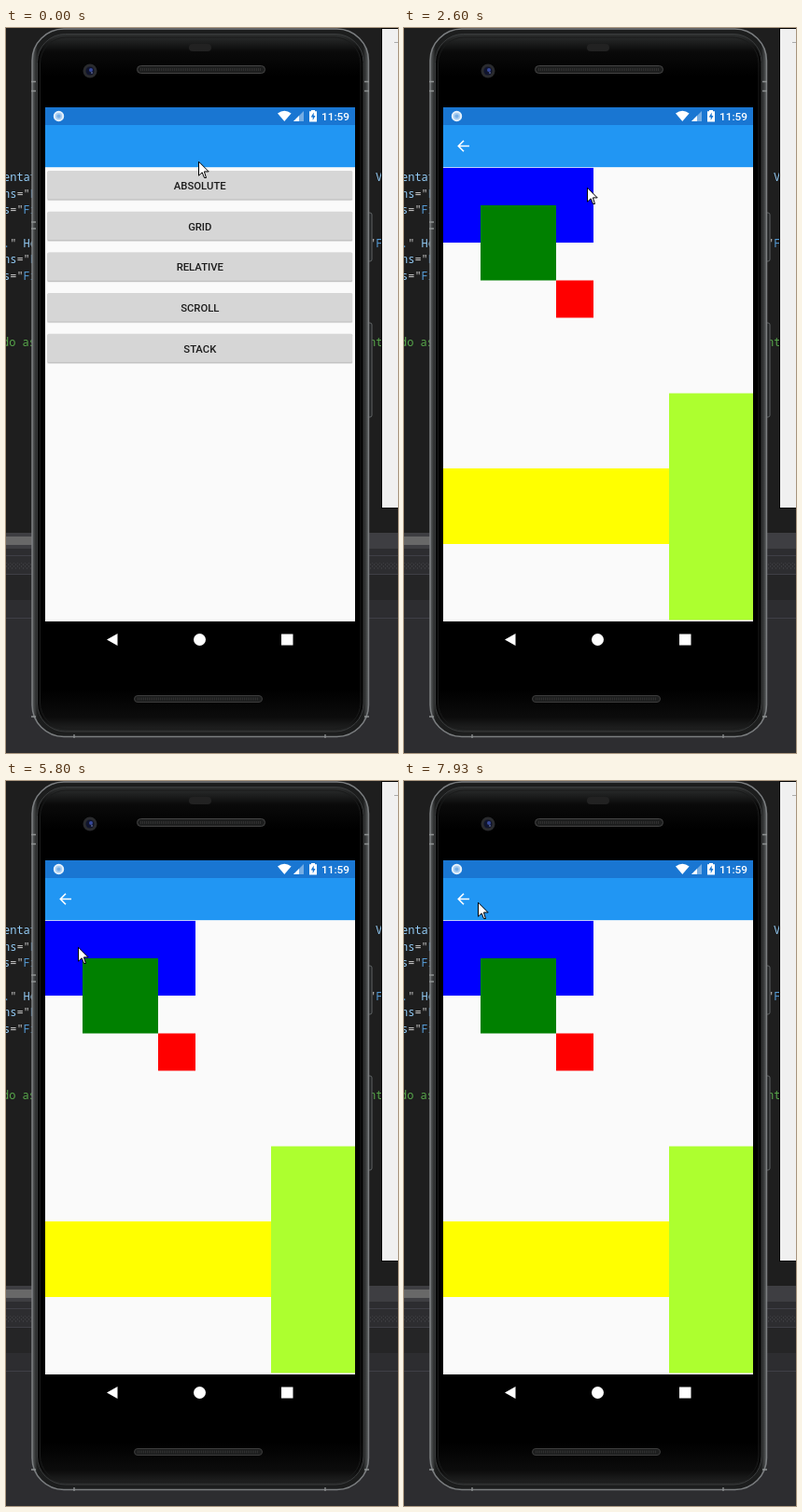
An HTML page for the animation above (8 s loop, 420 px wide and 777 px high).

```html
<!DOCTYPE html>
<html lang="en">
<head>
<meta charset="utf-8">
<title>Layout demo</title>
<style>
html, body { margin: 0; width: 100%; height: 100%; overflow: hidden; background: #1e1e1e; }
svg { display: block; width: 100%; height: 100%; }
.code { font: 12px "Noto Sans Mono", "DejaVu Sans Mono", monospace; white-space: pre; }
.ui { font-family: Roboto, sans-serif; font-weight: 500; }
</style>
</head>
<body>
<svg viewBox="0 0 420 777">
  <defs>
    <linearGradient id="gloss" x2="0" y2="1">
      <stop offset="0" stop-color="#2e3030"/>
      <stop offset=".025" stop-color="#0a0a0a"/>
      <stop offset=".06" stop-color="#000"/>
      <stop offset=".94" stop-color="#000"/>
      <stop offset=".98" stop-color="#0c0c0c"/>
      <stop offset="1" stop-color="#242525"/>
    </linearGradient>
    <linearGradient id="rim">
      <stop offset="0" stop-color="#5c5f60"/>
      <stop offset=".016" stop-color="#1c1d1d"/>
      <stop offset=".984" stop-color="#1c1d1d"/>
      <stop offset="1" stop-color="#5c5f60"/>
    </linearGradient>
    <pattern id="dots" width="4" height="4" patternUnits="userSpaceOnUse">
      <path d="M0 1h1M2 3h1" stroke="#4a4a4e"/>
    </pattern>
    <clipPath id="page"><rect x="42" y="149.800" width="332" height="486.200"/></clipPath>
  </defs>

  <rect width="420" height="777" fill="#1e1e1e"/>
  <rect y="541" width="420" height="17" fill="#3e3e42"/>
  <rect y="545" width="30" height="9" fill="#686868"/>
  <rect y="558" width="420" height="219" fill="#2d2d30"/>
  <rect y="573" width="420" height="7" fill="url(#dots)"/>
  <path d="M0 565.5H420M0 585.5H420M0 632.5H420" stroke="#3f3f46"/>
  <rect y="586" width="420" height="27" fill="#252526"/>
  <g id="code" class="code"></g>
  <rect x="402.500" y=".5" width="20" height="514" fill="#f0f0f0" stroke="#000"/>
  <path d="M416 15.500h4" stroke="#aaa"/>

  <g>
    <rect x="386" y="198" width="6" height="52" rx="2" fill="#222425" stroke="#606365"/>
    <rect x="386" y="316" width="6" height="101" rx="2" fill="#222425" stroke="#606365"/>
    <rect x="28" y="1" width="360.500" height="758.500" rx="34" fill="url(#rim)" stroke="#7b7e80" stroke-width="1.500"/>
    <path d="M27 57.500h5M27 67.500h5M27 208h5M27 215h5M384 57.500h5M384 67.500h5M27 738h5M384 738h5M73 757v4M342 757v4" stroke="#8f9293" stroke-width="1.300"/>
    <rect x="33.500" y="6.500" width="349.500" height="747.500" rx="30" fill="url(#gloss)" stroke="#3a3c3d"/>
    <rect x="36.500" y="10" width="343.500" height="741" rx="28" fill="none" stroke="#1a1b1b"/>
    <rect x="196" y="17" width="24" height="8" rx="4" fill="#222"/>
    <rect x="140.500" y="40.500" width="137" height="8" rx="4" fill="#1d1e1e" stroke="#444"/>
    <path d="M144 44.500H274" stroke="#303030" stroke-width="3" stroke-dasharray="1 1"/>
    <rect x="137.500" y="715.500" width="137" height="7" rx="3.500" fill="#1d1e1e" stroke="#3c3c3c"/>
    <path d="M141 719H271" stroke="#303030" stroke-width="3" stroke-dasharray="1 1"/>
    <circle cx="90" cy="46" r="7.500" fill="#2a2b2e"/>
    <circle cx="90" cy="46" r="4.500" fill="#10142c"/>
    <circle cx="91" cy="45" r="2" fill="#36489a"/>
    <circle cx="92" cy="48" r=".8" fill="#8997c8"/>
  </g>

  <rect x="42" y="85" width="332" height="19" fill="#1976d2"/>
  <rect x="42" y="104" width="332" height="46" fill="#2196f3"/>
  <rect x="42" y="149.200" width="332" height="486.800" fill="#fafafa"/>
  <rect x="42" y="636" width="332" height="38"/>
  <circle cx="56.500" cy="94.500" r="4.700" fill="#a9cdf0" stroke="#e4f0fb" stroke-width="2"/>
  <circle cx="56.500" cy="94.500" r="2" fill="#76aee6"/>
  <path d="M298.300 100L291 91.500Q298.300 86 305.600 91.500Z" fill="#fff"/>
  <path d="M319 89V100H308Z" fill="#75ade4"/>
  <path d="M314 94V100H308Z" fill="#fff"/>
  <path d="M327 88h4v1.300h2V100.500h-8V89.300h2Z" fill="#fff"/>
  <path d="M329.700 90.500L326.700 95.500H328.700V99L331.500 94H329.700Z" fill="#1976d2"/>
  <text class="ui" x="338" y="99" font-size="11.800" fill="#fff">11:59</text>
  <path id="back" d="M70 126.500H58.500M64 120.800L58.300 126.500L64 132.200" fill="none" stroke="#fff" stroke-width="1.600"/>
  <path d="M108 655.500L119.500 649V662Z" fill="#fff"/>
  <circle cx="207.500" cy="655.500" r="6.500" fill="#fff"/>
  <rect x="295" y="649.500" width="12.500" height="12" fill="#fff"/>

  <g clip-path="url(#page)">
    <g id="menu" class="ui" font-size="11.300" fill="#1c1c1c" text-anchor="middle"></g>
    <g id="boxes">
      <rect x="42" y="149" width="332" height="487" fill="#fafafa"/>
      <rect x="42" y="149.500" width="161" height="80.500" fill="#00f"/>
      <rect x="82" y="190" width="81" height="80.500" fill="#008000"/>
      <rect x="163" y="270.500" width="40" height="40" fill="#f00"/>
      <rect x="42" y="472" width="242" height="81" fill="#ff0"/>
      <rect x="284" y="391.500" width="90" height="243" fill="#adff2f"/>
    </g>
  </g>
  <path id="cursor" d="M.5 1.200V16.200L4.200 12.800L6.500 18.500H8.500L6.400 11.900H11.200Z" fill="#fff" stroke="#000"/>
</svg>
<script>
const LOOP = 8000, STEP = 1000 / 15, CX = 208, CY = 392.5;
const $ = id => document.getElementById(id);
const NS = "http://www.w3.org/2000/svg";

function add(parent, tag, attrs, text = "") {
  const el = document.createElementNS(NS, tag);
  for (const key in attrs) el.setAttribute(key, attrs[key]);
  el.textContent = text;
  parent.append(el);
  return el;
}

["ABSOLUTE", "GRID", "RELATIVE", "SCROLL", "STACK"].forEach((label, i) => {
  const y = 153 + i * 43.7;
  const bar = (x, dy, w, h, fill) => add($("menu"), "rect", { x, y: y + dy, width: w, height: h, rx: 1.5, fill });
  bar(44, 0, 327.5, 32.2, "#e6e6e6");
  bar(44.5, 0.5, 326.5, 31, "#c2c2c2");
  bar(44.5, 0, 326.5, 30.3, "#d6d6d6");
  add($("menu"), "text", { x: 207.8, y: y + 20 }, label);
});

const ATTR = "#92caf4", VALUE = "#569cd6", PLAIN = "#c8c8c8", NOTE = "#57a64a";
function codeLine(x, y, ...parts) {
  const line = add($("code"), "text", { x, y });
  for (const [text, fill] of parts) add(line, "tspan", { fill }, text);
}
codeLine(-3, 164, ["entat", ATTR]);
for (const y of [182, 252]) codeLine(-3, y, ["ns", ATTR], ["=\"", PLAIN], ["F", VALUE]);
for (const y of [199, 270]) codeLine(-3, y, ["s", ATTR], ["=\"", PLAIN], ["Fi", VALUE]);
codeLine(-3, 235, [".", VALUE], ["\" ", PLAIN], ["He", ATTR]);
codeLine(-4, 341, ["do as", NOTE]);
codeLine(396, 164, ["V", ATTR]);
codeLine(389, 235, ["\"", PLAIN], ["F", VALUE]);
codeLine(389, 341, ["nt", NOTE]);

// Pointer path: time, x, y
const path = [
  [0, 206, 142], [200, 218, 177], [467, 218, 177], [533, 153, 168], [600, 153, 168],
  [667, 149, 168], [800, 149, 168], [1067, 207, 161], [1267, 207, 161], [1467, 207, 163],
  [2000, 207, 163], [2200, 207, 167], [2533, 207, 167], [2930, 140, 187], [3333, 74, 170],
  [3467, 74, 170], [3533, 71, 168], [3860, 120, 225], [4200, 182, 307], [4400, 182, 307],
  [4733, 216, 515], [4933, 216, 515], [5200, 329, 504], [5400, 329, 504], [5800, 77, 177],
  [6000, 77, 177], [6333, 180, 285], [6733, 336, 409], [6867, 249, 503], [7300, 64, 440],
  [7733, 120, 177], [7933, 79, 129], [8000, 79, 129]
];

function pointAt(t) {
  const i = Math.max(1, path.findIndex(p => p[0] >= t));
  const [t0, x0, y0] = path[i - 1], [t1, x1, y1] = path[i];
  const k = (t - t0) / (t1 - t0);
  return [x0 + (x1 - x0) * k, y0 + (y1 - y0) * k].map(Math.round);
}

function zoom(el, s) {
  el.setAttribute("transform", `translate(${CX} ${CY}) scale(${s}) translate(${-CX} ${-CY})`);
}

function draw(ms) {
  const t = Math.round(Math.floor((ms + 5) / STEP) * STEP) % LOOP;
  const p = Math.min(1, Math.max(0, (t - 2035) / 290));
  zoom($("menu"), 1 - 0.03 * p);
  zoom($("boxes"), 1 + 0.075 * (1 - p));
  $("boxes").setAttribute("opacity", p);
  $("back").setAttribute("opacity", p > 0 ? 1 : 0);
  $("cursor").setAttribute("transform", `translate(${pointAt(t)})`);
}

const start = performance.now();
function tick() {
  draw((performance.now() - start) % LOOP);
  requestAnimationFrame(tick);
}
tick();
</script>
</body>
</html>
```
